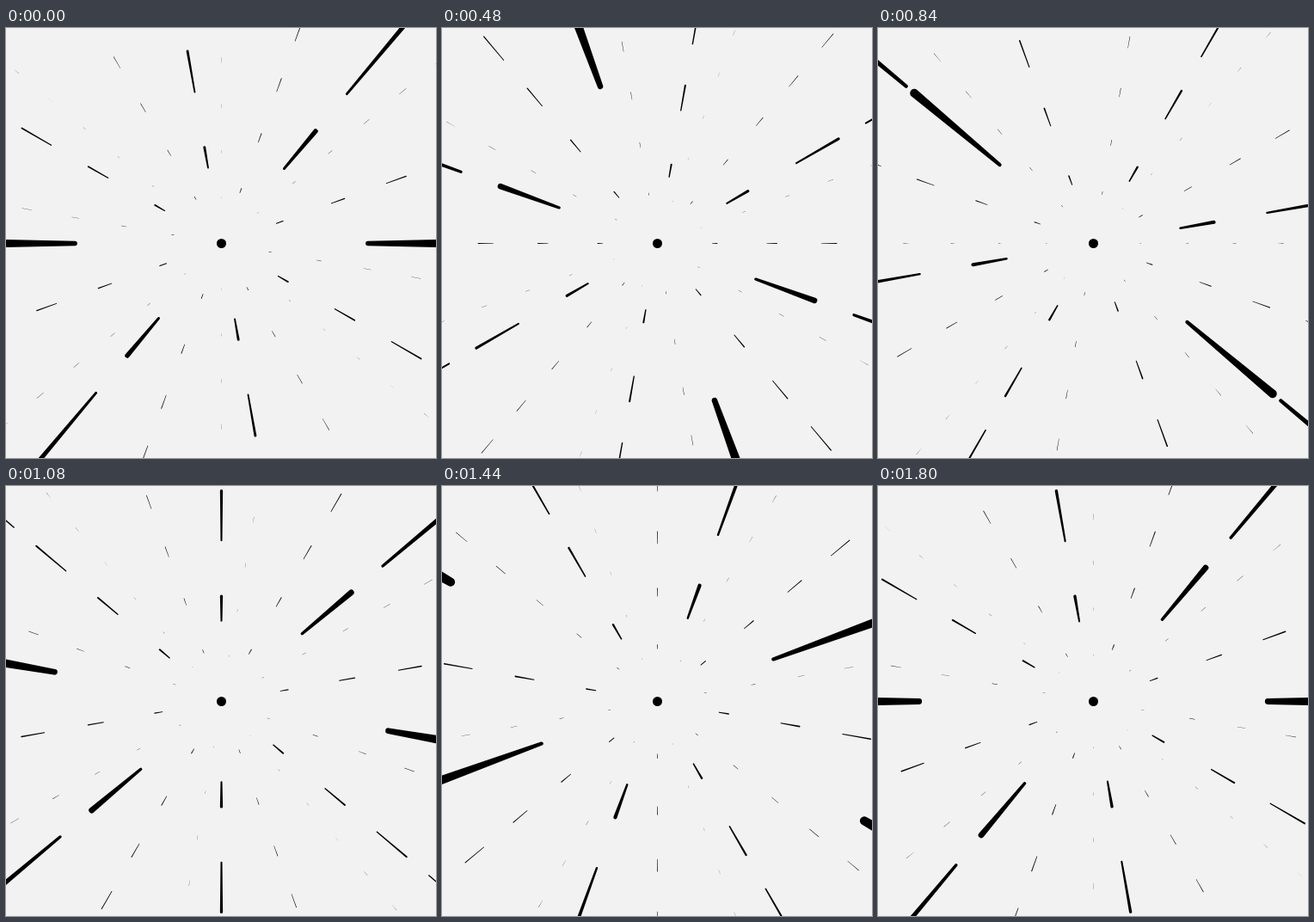
Write an HTML page with a canvas that moves like this. It is 500 px wide and 500 px high and loops after 1840 ms.

```html
<!DOCTYPE html>
<html lang="en">
<head>
<meta charset="utf-8">
<title>Radial dashes</title>
<style>
html, body { margin: 0; width: 100%; height: 100%; overflow: hidden; background: #f2f2f2; }
canvas { display: block; }
</style>
</head>
<body>
<canvas id="stage" width="500" height="500"></canvas>
<script>
const ctx = document.getElementById('stage').getContext('2d');
const LOOP = 1840, TICK = 40, SPOKES = 18, C = 250.5, REACH = 370;

// Steps travelled after a number of ticks; the pace drops near the loop's end.
const PACE = [[0, 0], [36, 14.35], [45, 17.72], [46, 18]];
function travel(tick) {
  let j = 1;
  while (tick > PACE[j][0]) j++;
  const [a, u] = PACE[j - 1], [b, v] = PACE[j];
  return u + (v - u) * (tick - a) / (b - a);
}

// Radius falls quickly at first, then settles towards the hub.
function radius(p) {
  return 1000 / Math.max(1.4, 21.43 - 15.56 * Math.pow(0.811, p));
}

function thickness(r) {
  return Math.max(0, 0.045 * (r - 49));
}

// Tapered stroke along +x with round ends
function dash(x0, x1, w0, w1) {
  ctx.beginPath();
  ctx.arc(x0, 0, w0 / 2, Math.PI / 2, Math.PI * 1.5);
  ctx.arc(x1, 0, w1 / 2, -Math.PI / 2, Math.PI / 2);
  ctx.closePath();
  ctx.fill();
}

function spoke(angle, p) {
  const r0 = radius(p), r1 = radius(p - 1);
  const w0 = thickness(r0), w1 = thickness(r1);
  if (w1 < 0.14) return;
  for (const turn of [0, Math.PI]) {
    ctx.save();
    ctx.translate(C, C);
    ctx.rotate(turn - angle);
    for (let n = 1; n * r0 < REACH; n++) dash(n * r0, n * r1, w0, w1);
    ctx.restore();
  }
}

function draw(ms) {
  const shift = travel(Math.floor((ms % LOOP) / TICK));
  ctx.fillStyle = '#f2f2f2';
  ctx.fillRect(0, 0, 500, 500);
  ctx.fillStyle = '#000';
  for (let k = 0; k < SPOKES; k++) {
    const p = (k + shift + 1.5) % SPOKES - 1.5;
    spoke(k * 50 * Math.PI / 180, p);
  }
  ctx.beginPath();
  ctx.arc(C, C, 5.5, 0, Math.PI * 2);
  ctx.fill();
}

const start = performance.now();
function loop() {
  draw(performance.now() - start);
  requestAnimationFrame(loop);
}
loop();
</script>
</body>
</html>
```
